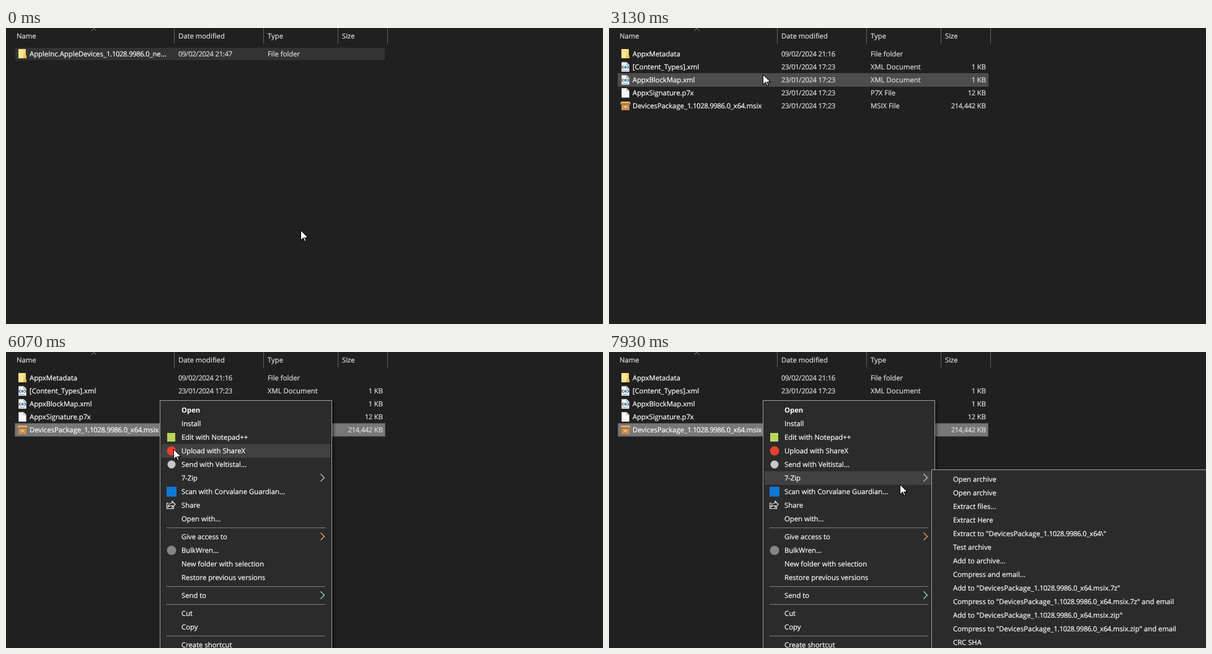
These frames come from a looping animation (963x479 px, 8 s). An HTML page:

```html
<!DOCTYPE html>
<html lang="en">
<head>
<meta charset="utf-8">
<title>File list with context menu</title>
<style>
html, body { margin: 0; width: 100%; height: 100%; overflow: hidden; background: #202020; }
svg { display: block; width: 963px; height: 479px; }
text { font: 11.3px "Open Sans", "Noto Sans", sans-serif; fill: #fff; stroke: #fff; stroke-width: .2px; white-space: pre; text-rendering: geometricPrecision; }
.dim { fill: #dedede; stroke: #dedede; }
.bold { font-weight: 700; stroke: none; }
.num { letter-spacing: -.42px; }
.menu { fill: #2b2b2b; stroke: #a0a0a0; filter: drop-shadow(3px 3px 2px rgba(0, 0, 0, .5)); }
#cursor { shape-rendering: crispEdges; }
</style>
</head>
<body>
<svg id="stage" viewBox="0 0 963 479"></svg>
<script>
const FRAME = 1000 / 15, LOOP = 8000;

// ---- markup helpers ----
const esc = s => s.replace(/&/g, '&amp;').replace(/</g, '&lt;');
const label = (x, mid, s, cls = '', anchor = 'start') =>
  `<text x="${x}" y="${mid + 4}" class="${cls}" text-anchor="${anchor}">` +
  esc(s).replace(/\d+/g, '<tspan class="num">$&</tspan>') + '</text>';
const rect = (x, y, w, h, fill, extra = '') =>
  `<rect x="${x}" y="${y}" width="${w}" height="${h}" fill="${fill}" ${extra}/>`;
const path = (d, fill, stroke = 'none', w = 1) =>
  `<path d="${d}" fill="${fill}" stroke="${stroke}" stroke-width="${w}"/>`;
const dot = (x, y, r, fill) => `<circle cx="${x}" cy="${y}" r="${r}" fill="${fill}"/>`;
const group = (id, body) => `<g id="${id}">${body}</g>`;

// ---- file icons, drawn around a row's middle ----
const page = y => path(`M20.5 ${y - 7.5}h8l4 4v11h-12z`, '#f7f7f7', '#b4b4b4') +
  path(`M28.5 ${y - 7.5}v4h4`, '#ddd', '#a8a8a8');
const icons = {
  folder: y => rect(20, y - 8, 12, 15, '#f9d671') + rect(20, y - 8, 8, 15, '#ffe594') +
    path(`M28 ${y + 7}v-5h5v5z`, '#eec04e'),
  page,
  xml: y => page(y) + path(`M23.5 ${y - 2}l-2.5 2.5 2.5 2.5M29.5 ${y - 2}l2.5 2.5-2.5 2.5`, 'none', '#3a5f84', 1.2) +
    dot(26.5, y + .5, 2.2, '#3c8cb4') + rect(22, y + 5, 8, 1, '#8b9aa8'),
  box: y => rect(20, y - 4, 13, 11, '#c98f50') + path(`M18 ${y - 4}l2-3h13l2 3z`, '#e0ad70') +
    rect(18, y - 4, 17, 2, '#a56c33') + rect(24, y, 5, 3, '#e6bd85')
};

const fileRow = (i, icon, name, date, type, size = '') => {
  const y = 42 + 21 * i;
  return icons[icon](y) + label(38, y, name) + label(278, y, date, 'dim') +
    label(422, y, type, 'dim') + label(608, y, size, 'dim', 'end');
};

const columns = [[17, 'Name', 271], [278, 'Date modified', 415], [422, 'Type', 535], [542, 'Size', 615]];
const header = columns.map(([x, s, edge]) => label(x, 13, s, 'dim') + rect(edge, 0, 1, 25, '#636363')).join('') +
  path('M137.5 4.5l4-4 4 4', 'none', '#9a9a9a');

const built = '23/01/2024 17:23', pack = 'DevicesPackage_1.1028.9986.0_x64';
const files = [
  ['folder', 'AppxMetadata', '09/02/2024 21:16', 'File folder'],
  ['xml', '[Content_Types].xml', built, 'XML Document', '1 KB'],
  ['xml', 'AppxBlockMap.xml', built, 'XML Document', '1 KB'],
  ['page', 'AppxSignature.p7x', built, 'P7X File', '12 KB'],
  ['box', pack + '.msix', built, 'MSIX File', '214,442 KB']
].map((f, i) => fileRow(i, ...f)).join('');

// ---- context menu ----
const share = path('M262.5 244.5h-3v9h11v-3M261.5 250.5c.5-4 3-6 6.5-6v-3l5 5-5 5v-3c-3 0-5 .5-6.5 2z', 'none', '#f0f0f0', 1.2);
const marks = rect(260, 131, 13, 14, '#b9d65c') + dot(267, 160, 7.5, '#e8402f') +
  dot(267, 182, 6.5, '#c8c8c8') + rect(259, 218, 16, 16, '#0f78d4') + share + dot(267, 321, 7.5, '#858585');
const blocks = [
  [94, 'Open', 'Install', 'Edit with Notepad++', 'Upload with ShareX', 'Send with Veltistal...', '7-Zip',
    'Scan with Corvalane Guardian...', 'Share', 'Open with...'],
  [299, 'Give access to', 'BulkWren...', 'New folder with selection', 'Restore previous versions'],
  [394, 'Send to'], [423, 'Cut', 'Copy'], [474, 'Create shortcut']
];
const menuText = blocks.map(([y, ...items], b) =>
  (b ? rect(259, y - 15, 256, 1, '#808080') : '') +
  items.map((s, i) => label(283, y + 22 * i, s, s === 'Open' ? 'bold' : '')).join('')).join('');
const arrows = [[204, '#b4e6e0'], [299, '#f2bd88'], [394, '#b4e6e0']]
  .map(([y, c]) => path(`M507.5 ${y - 6.5}l6 6-6 6`, 'none', c, 1.2)).join('');

const subItems = ['Open archive', 'Open archive', 'Extract files...', 'Extract Here', `Extract to "${pack}\\"`,
  'Test archive', 'Add to archive...', 'Compress and email...', `Add to "${pack}.msix.7z"`,
  `Compress to "${pack}.msix.7z" and email`, `Add to "${pack}.msix.zip"`,
  `Compress to "${pack}.msix.zip" and email`, 'CRC SHA'];

const stage = document.getElementById('stage');
stage.innerHTML = rect(0, 0, 963, 479, '#202020') + header +
  rect(14, 31, 598, 22, '#4d4d4d', 'id="row"') +
  rect(14.5, 115.5, 597, 21, 'none', 'id="focus" stroke="#8a8a8a" stroke-dasharray="1"') +
  group('start', fileRow(0, 'folder', 'AppleInc.AppleDevices_1.1028.9986.0_ne...', '09/02/2024 21:47', 'File folder')) +
  group('busy', label(481.5, 48, 'Working on it...', '', 'middle')) +
  group('files', files) +
  group('menu', rect(248.5, 78.5, 277, 420, '#2b2b2b', 'class="menu"') +
    rect(251, 0, 272, 22, '#414141', 'id="hot"') + marks + menuText + arrows) +
  group('sub', rect(520.5, 190.5, 480, 320, '#2b2b2b', 'class="menu"') +
    subItems.map((s, i) => label(555, 206 + 22 * i, s)).join('')) +
  group('cursor', path('M.5 .5V16.5L4.3 12.8 6.9 18.5 9.2 17.5 6.7 12H11.7Z', '#fff', '#000'));

// ---- motion ----
const swing = a => p => (1 - Math.cos(a * Math.PI * p)) / (1 - Math.cos(a * Math.PI));
const easeOut = p => 1 - (1 - p) ** 2;
// first tick, last tick, from, to, easing for x, easing for y
const moves = [
  [4, 17, [475, 327], [258, 90], swing(.85), swing(.85)],
  [17, 24, [258, 90], [245, 48], easeOut, easeOut],
  [43, 53, [245, 48], [248, 127], p => Math.min(1, p * 2.5), swing(1)],
  [83, 98, [248, 127], [297, 194], swing(.85), swing(.85)],
  [104, 119, [297, 194], [469, 214], swing(.9), p => easeOut(Math.min(1, p * 1.15))]
];

function pointer(k) {
  const [a, b, from, to, fx, fy] = moves.filter(m => k >= m[0]).pop() || moves[0];
  const p = Math.min(1, Math.max(0, (k - a) / (b - a)));
  return [fx, fy].map((f, i) => Math.round(from[i] + (to[i] - from[i]) * f(p)));
}

const el = id => document.getElementById(id);
const show = (id, on) => el(id).setAttribute('display', on ? 'inline' : 'none');
const place = (id, attrs) => Object.entries(attrs).forEach(([n, v]) => el(id).setAttribute(n, v));

function draw(time) {
  const k = Math.floor((time % LOOP + 4) / FRAME);
  const [x, y] = pointer(k);
  const line = k < 32 ? 0 : k >= 59 ? 4 : Math.min(4, Math.floor((y - 31) / 21));
  const over = k < 32 ? y < 53 : k < 59;
  const inset = over ? 0 : 1;
  const fill = over ? '#4d4d4d' : k < 32 ? '#333' : k < 62 ? '#6b6b6b' : '#777';

  place('row', { x: 14 + inset, y: 31 + 21 * line + inset, width: 598 - 2 * inset, height: 22 - 2 * inset, fill });
  show('row', k !== 32);
  show('focus', k >= 59);
  show('start', k < 32);
  show('busy', k === 32);
  show('files', k > 32);
  show('menu', k >= 75);
  show('sub', k >= 105);

  place('hot', { y: 83 + 22 * Math.min(5, Math.floor((y - 83) / 22)) });
  show('hot', k >= 84 && x >= 249);
  place('cursor', { transform: `translate(${x} ${y})` });
}

const began = performance.now();
function tick() {
  draw(performance.now() - began);
  requestAnimationFrame(tick);
}
tick();
</script>
</body>
</html>
```
